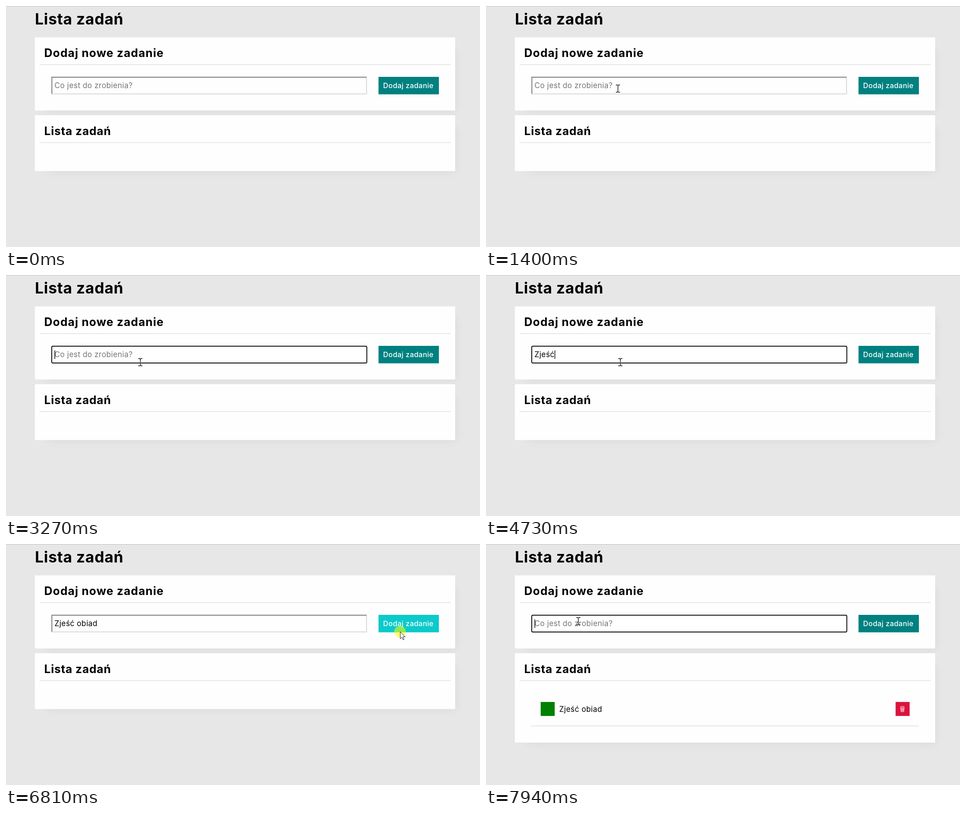
Recreate the animation shown at these times as an HTML page. Size 1049 px wide and 534 px high, loop 8 s.

```html
<!DOCTYPE html>
<html lang="pl">
<head>
<meta charset="utf-8">
<title>Lista zadań</title>
<style>
  html, body { margin: 0; width: 100%; height: 100%; overflow: hidden; background: #e7e7e7; }
  svg { display: block; width: 100%; height: 100%; }
  text { font-family: Inter, sans-serif; font-size: 16.6px; letter-spacing: .4px; white-space: pre; }
  .h1 { font-size: 34px; font-weight: 700; letter-spacing: .6px; }
  .h2 { font-size: 25.2px; font-weight: 700; letter-spacing: .7px; }
  .wide { letter-spacing: 1px; }
  .label { font-size: 15.8px; font-weight: 500; letter-spacing: .35px; fill: #fff; }
  .card { fill: #fefefe; }
  .shadow { fill: #000; opacity: .05; filter: blur(11px); }
  .rule { fill: #e7e7e7; }
</style>
</head>
<body>
<svg viewBox="0 0 1049 534">
  <rect width="1049" height="534" fill="#e7e7e7"/>
  <rect width="1049" height="1" fill="#c3c3c3"/>
  <text class="h1" x="64" y="40.5">Lista zadań</text>

  <rect class="shadow" x="90" y="96" width="906" height="138"/>
  <rect class="card" x="64" y="69.5" width="930" height="162"/>
  <text class="h2 wide" x="84.5" y="113">Dodaj nowe zadanie</text>
  <rect class="rule" x="74" y="129" width="910" height="2"/>

  <g id="idle">
    <path d="M100.5 195.7V156.7H799L797 158.7H102.5V193.7Z" fill="#7b7b7b"/>
    <path d="M100.5 195.7H799V156.7L797 158.7V193.7H102.5Z" fill="#d9d9d9"/>
  </g>
  <rect id="ring" x="101.2" y="157.7" width="697.3" height="37.3" rx="2.5" fill="#fff" stroke="#101010" stroke-width="2"/>
  <text id="hint" x="107.3" y="182" fill="#757575">Co jest do zrobienia?</text>
  <text id="typed" x="107.3" y="182"></text>
  <rect id="caret" y="167" width="1.4" height="19"/>

  <rect id="button" x="824.4" y="157" width="133.6" height="38.7"/>
  <text class="label" x="834.5" y="181.5">Dodaj zadanie</text>

  <rect id="listShadow" class="shadow" x="90" y="268" width="906"/>
  <rect id="list" class="card" x="64" y="242" width="930"/>
  <text class="h2" x="84.5" y="285.5">Lista zadań</text>
  <rect class="rule" x="74" y="301.7" width="910" height="2"/>
  <g id="item">
    <rect x="121" y="350" width="31" height="31" fill="#008000"/>
    <text x="162" y="371.5">Zjeść obiad</text>
    <rect x="906.5" y="350" width="31" height="31" fill="#dc143c"/>
    <g fill="none" stroke="#fff" stroke-width=".9">
      <ellipse cx="921.5" cy="361" rx="4" ry="1.3"/>
      <path d="M917.5 361.5L918.3 371.2Q921.5 372.8 924.7 371.2L925.5 361.5M920 363.5L920.3 371M923 363.5L922.7 371M918 365H925M918.3 368H924.7"/>
    </g>
    <rect class="rule" x="100" y="402" width="858" height="2"/>
  </g>

  <circle id="press" r="12.7" fill="#ffff00" fill-opacity=".55"/>
  <path id="arrow" d="M.5 .5V16L4.2 12.6L6.6 18.3L9 17.3L6.6 11.7H11.5Z" fill="#fff" stroke="#222" stroke-width="1"/>
  <g id="beam" fill="none">
    <path d="M-4.5 -8H-1.5L0 -7L1.5 -8H4.5M0 -7V7M-4.5 8H-1.5L0 7L1.5 8H4.5" stroke="#fff" stroke-width="2.6" opacity=".7"/>
    <path d="M-4.5 -8H-1.5L0 -7L1.5 -8H4.5M0 -7V7M-4.5 8H-1.5L0 7L1.5 8H4.5" stroke="#111" stroke-width="1.4"/>
  </g>
</svg>
<script>
const LOOP = 8000;
const WORD = "Zjeść\u00a0obiad";
const KEYS = [3800, 4130, 4260, 4530, 4730, 4860, 5000, 5260, 5410, 5540, 5870];
const CARET_OFF = [[2750, 3270], [6400, 6810], [7470, 7940]];
const FOCUS = 2200, PRESS = 6810, ADDED = 6940;

const ui = {};
document.querySelectorAll("[id]").forEach(el => ui[el.id] = el);

const within = (t, a, b) => t >= a && t < b;
const show = (el, on) => el.setAttribute("visibility", on ? "visible" : "hidden");
const linear = p => p;
const easeOut = p => 1 - (1 - p) ** 2;
const easeInOut = n => p => p < .5 ? (2 * p) ** n / 2 : 1 - (2 - 2 * p) ** n / 2;

// Each move: start time, number of cursor updates, from, to, easing
const MOVES = [
  [580, 12, [894, 506], [293, 183], easeOut],
  [1400, 1, [293, 183], [292, 183], linear],
  [2750, 2, [292, 183], [297.3, 193.3], linear],
  [6140, 8, [297.3, 193.3], [872, 194], easeInOut(4)],
  [7470, 6, [872, 194], [204.3, 171], easeInOut(3)]
];
const TICK = 67;

function cursorAt(t) {
  const move = MOVES.filter(m => t >= m[0]).pop();
  if (!move) return null;
  const [start, count, a, b, ease] = move;
  const step = Math.min(count, Math.floor((t - start + 2) / TICK) + 1);
  const p = ease(start === 580 ? (step - 1) / (count - 1) : step / count);
  return a.map((v, i) => v + (b[i] - v) * p);
}

function drawCursor(t) {
  const pos = cursorAt(t);
  const pressed = within(t, FOCUS, 2330) || within(t, PRESS, ADDED);
  const [x, y] = pos || [0, 0];
  const inRow = y >= 157 && y <= 196;
  const overInput = inRow && within(x, 100, 799);
  const overButton = inRow && within(x, 824, 958);
  const place = `translate(${x} ${y})`;
  [ui.arrow, ui.beam, ui.press].forEach(el => el.setAttribute("transform", place));
  show(ui.arrow, pos && !overInput);
  show(ui.beam, pos && overInput);
  show(ui.press, pressed);
  ui.button.setAttribute("fill", !overButton ? "#008080" : pressed ? "#0ccaca" : "#0cabab");
}

function draw(t) {
  const added = t >= ADDED;
  const count = added ? 0 : KEYS.filter(k => t >= k).length;
  const focused = t >= FOCUS && !within(t, PRESS, ADDED);
  const bottom = added ? 440 : 365.7;

  show(ui.ring, focused);
  show(ui.idle, !focused);
  show(ui.hint, count === 0);
  show(ui.item, added);
  ui.list.setAttribute("height", bottom - 242);
  ui.listShadow.setAttribute("height", bottom - 266);

  ui.typed.textContent = WORD.slice(0, count);
  const width = count ? ui.typed.getComputedTextLength() : 0;
  ui.caret.setAttribute("x", 107.4 + width);
  show(ui.caret, focused && !CARET_OFF.some(([a, b]) => within(t, a, b)));

  drawCursor(t);
}

const begin = performance.now();
function frame() {
  draw((performance.now() - begin) % LOOP);
  requestAnimationFrame(frame);
}
frame();
</script>
</body>
</html>
```
